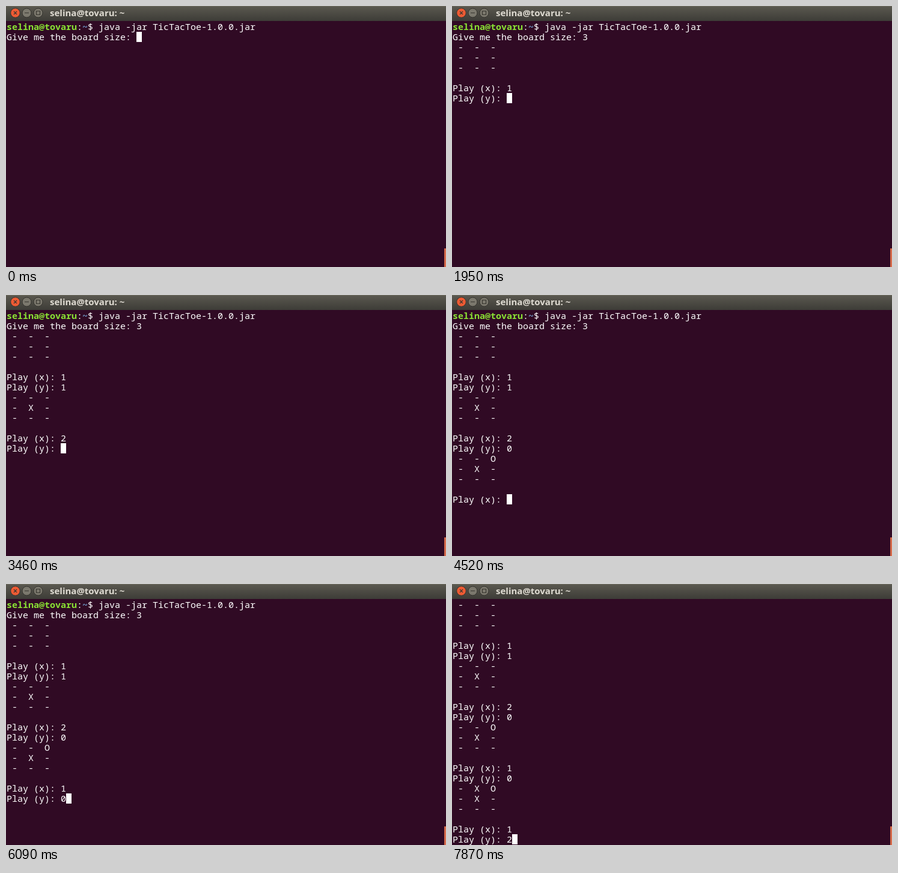
An HTML page for the animation above (8000 ms loop, 732x435 px).

```html
<!DOCTYPE html>
<html lang="en">
<head>
<meta charset="utf-8">
<title>Terminal</title>
<style>
  html, body { margin: 0; width: 100%; height: 100%; overflow: hidden; background: #300a24; }
  svg { display: block; width: 732px; height: 435px; }
  .term text { font: 15px "Noto Sans Mono", "DejaVu Sans Mono", monospace; fill: #fff; white-space: pre; }
  .term .user { font-weight: 700; fill: #8ae234; }
  .term .path { font-weight: 700; fill: #729fcf; }
  .title { font: 700 15px "Noto Sans", "Open Sans", sans-serif; fill: #dfdbd2; }
  .button { fill: #7b786d; stroke: #33322d; }
  .close { fill: #ee5b34; }
  .glyph { fill: none; stroke: #37352f; stroke-width: 1.2; }
</style>
</head>
<body>
<svg viewBox="0 0 732 435">
  <defs>
    <linearGradient id="bar" x2="0" y2="1">
      <stop offset="0" stop-color="#5b5950"/>
      <stop offset="1" stop-color="#3d3c37"/>
    </linearGradient>
  </defs>

  <rect width="732" height="435" fill="#300a24"/>
  <g class="term" id="term">
    <text id="prompt" x="1" y="40"><tspan class="user">selina@tovaru</tspan>:<tspan class="path">~</tspan>$ java -jar TicTacToe-1.0.0.jar</text>
    <rect id="cursor" width="9" height="17" fill="#fff"/>
  </g>
  <rect x="729" y="404" width="3" height="31" fill="#d4694a"/>

  <rect width="732" height="25" fill="url(#bar)"/>
  <rect width="732" height="1" fill="#686659"/>
  <circle class="button close" cx="15.5" cy="11.5" r="7.8"/>
  <circle class="button" cx="34.5" cy="11.5" r="7.5"/>
  <circle class="button" cx="53.5" cy="11.5" r="7.5"/>
  <path class="glyph" d="M13 9l5 5m0-5l-5 5M31 11.5h7M50.5 8.5h6v6h-6z"/>
  <text class="title" x="73" y="17">selina@tovaru: ~</text>
</svg>
<script>
  const LOOP = 8000, ROWS = 24, TOP = 26, LINE = 17, LEFT = 1, CELL = 9;
  const $ = id => document.getElementById(id);
  const term = $('term'), prompt = $('prompt'), cursor = $('cursor');

  const askX = '\nPlay (x): ', askY = '\nPlay (y): ';
  const board = (...rows) =>
    rows.map(row => '\n' + [...row].map(c => ` ${c} `).join('')).join('') + '\n' + askX;

  // [time, appended output, cursor hidden]
  const steps = [
    [0, '\nGive me the board size: '],
    [140, '', true],
    [460, ''],
    [500, '3'],
    [1030, board('---', '---', '---')],
    [1550, '1'],
    [1950, askY],
    [2440, '1'],
    [2730, board('---', '-X-', '---')],
    [3160, '2'],
    [3460, askY],
    [3950, '0'],
    [4520, board('--O', '-X-', '---')],
    [5090, '', true],
    [5230, ''],
    [5270, '1'],
    [5620, askY],
    [6090, '0'],
    [6500, board('-XO', '-X-', '---')],
    [6980, '1'],
    [7450, askY],
    [7870, '2']
  ];

  const rows = Array.from({ length: ROWS }, (_, i) => {
    const row = document.createElementNS('http://www.w3.org/2000/svg', 'text');
    row.setAttribute('x', LEFT);
    row.setAttribute('y', TOP + 14 + i * LINE);
    return term.insertBefore(row, cursor);
  });

  const show = (el, on) => el.setAttribute('visibility', on ? 'visible' : 'hidden');

  function render(index) {
    const output = steps.slice(0, index + 1).map(step => step[1]).join('');
    const lines = output.split('\n');
    const visible = lines.slice(-ROWS);
    const last = visible.length - 1;
    rows.forEach((row, i) => { row.textContent = visible[i] || ''; });
    show(prompt, lines.length <= ROWS);
    show(cursor, !steps[index][2]);
    cursor.setAttribute('x', LEFT + visible[last].length * CELL);
    cursor.setAttribute('y', TOP + last * LINE);
  }

  const start = performance.now();
  let shown = -1;

  function tick() {
    const time = (performance.now() - start) % LOOP;
    const index = steps.findLastIndex(step => step[0] <= time);
    if (index !== shown) render(shown = index);
    requestAnimationFrame(tick);
  }
  tick();
</script>
</body>
</html>
```
